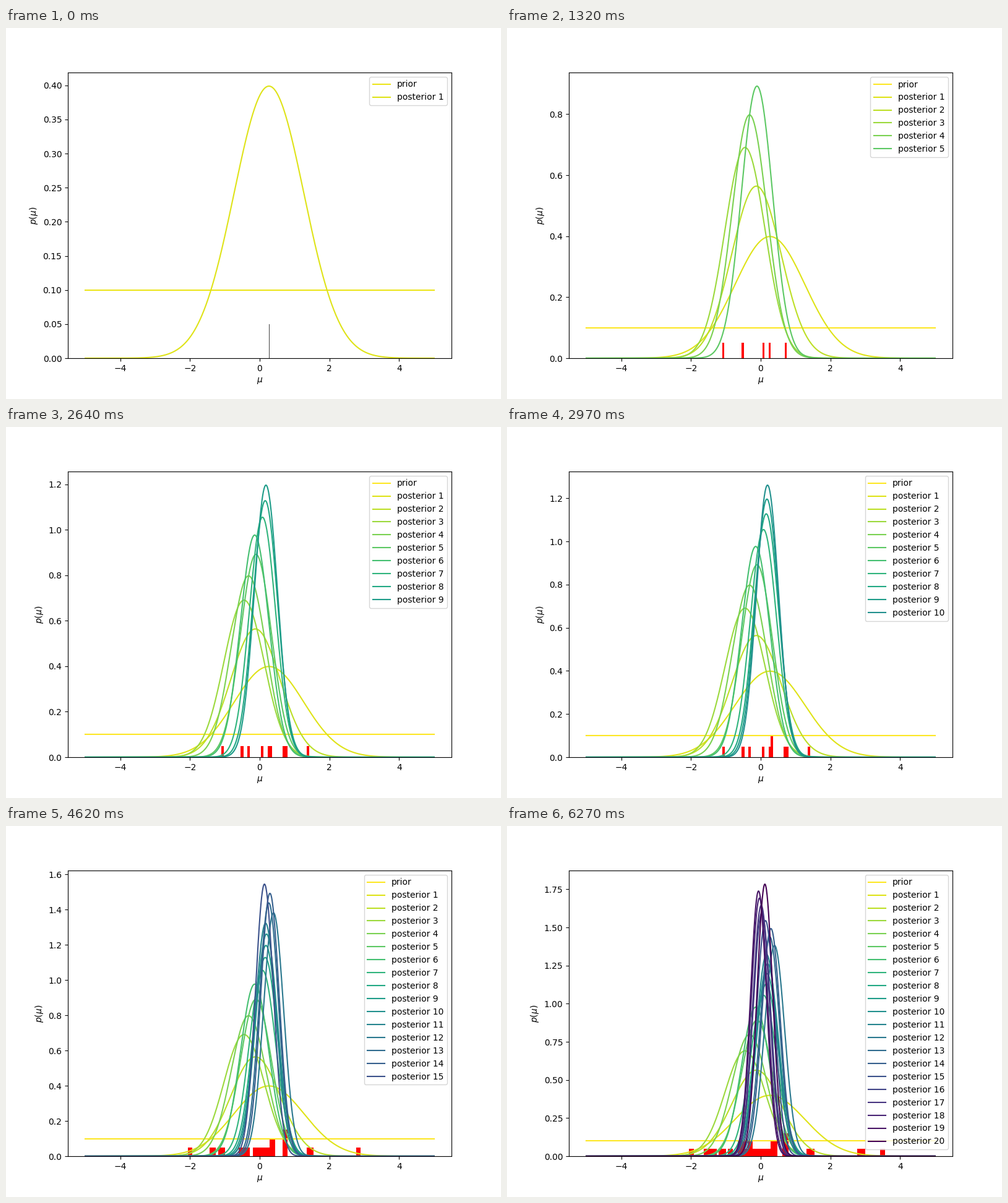
Write a matplotlib script that moves like this. It is 800 by 600 pixels and loops after 6.6 s.

```python
import numpy as np
import matplotlib.pyplot as plt
from matplotlib.animation import FuncAnimation

N = 20
BINS = 40
UNIT = 0.05  # bar height per sample
SAMPLES = np.array([
    0.266, -0.512, -1.1, 0.07, 0.745, -0.33, 1.42, 0.71, 0.343, 0.346,
    -0.093, 2.9, -1.366, 0.71, -2.058, -1.53, -0.28, -0.88, -0.54, 3.57])

mu = np.linspace(-5, 5, 1000)
cmap = plt.get_cmap("viridis_r")

fig, ax = plt.subplots(figsize=(8, 6), dpi=100)


def posterior(n):
    """Density of the mean after n unit-variance samples, flat prior."""
    m = SAMPLES[:n].mean()
    return np.sqrt(n / (2 * np.pi)) * np.exp(-n * (mu - m) ** 2 / 2)


def draw_hist(n, color):
    data = SAMPLES[:n]
    lo, hi = data.min(), data.max()
    if n == 1:
        # keep the lone sample just inside the bin to its right
        lo, hi = lo - 0.5001, hi + 0.4999
    counts, edges = np.histogram(data, BINS, (lo, hi))
    used = counts > 0
    ax.bar(edges[:-1][used], UNIT * counts[used], (hi - lo) / BINS,
           align="edge", color=color)


def draw(i):
    n = i + 1
    ax.clear()
    ax.plot(mu, np.full_like(mu, 0.1), label="prior",
            color="#ece51b" if n == 1 else cmap(0.0))
    # histograms pile up, one per new sample
    for k in range(1, n + 1):
        draw_hist(k, "#444444" if n == 1 else "red")
        ax.plot(mu, posterior(k), color=cmap(k / N), label=f"posterior {k}")
    ax.set_xlim(-5.5, 5.5)
    ax.set_ylim(0, 1.05 * np.sqrt(n / (2 * np.pi)))
    ax.set_xlabel(r"$\mu$")
    ax.set_ylabel(r"$p(\mu)$")
    ax.legend(loc="upper right")
    return []


anim = FuncAnimation(fig, draw, frames=N, init_func=lambda: draw(0),
                     interval=330, repeat=True, repeat_delay=0, blit=False)
plt.show()
```
